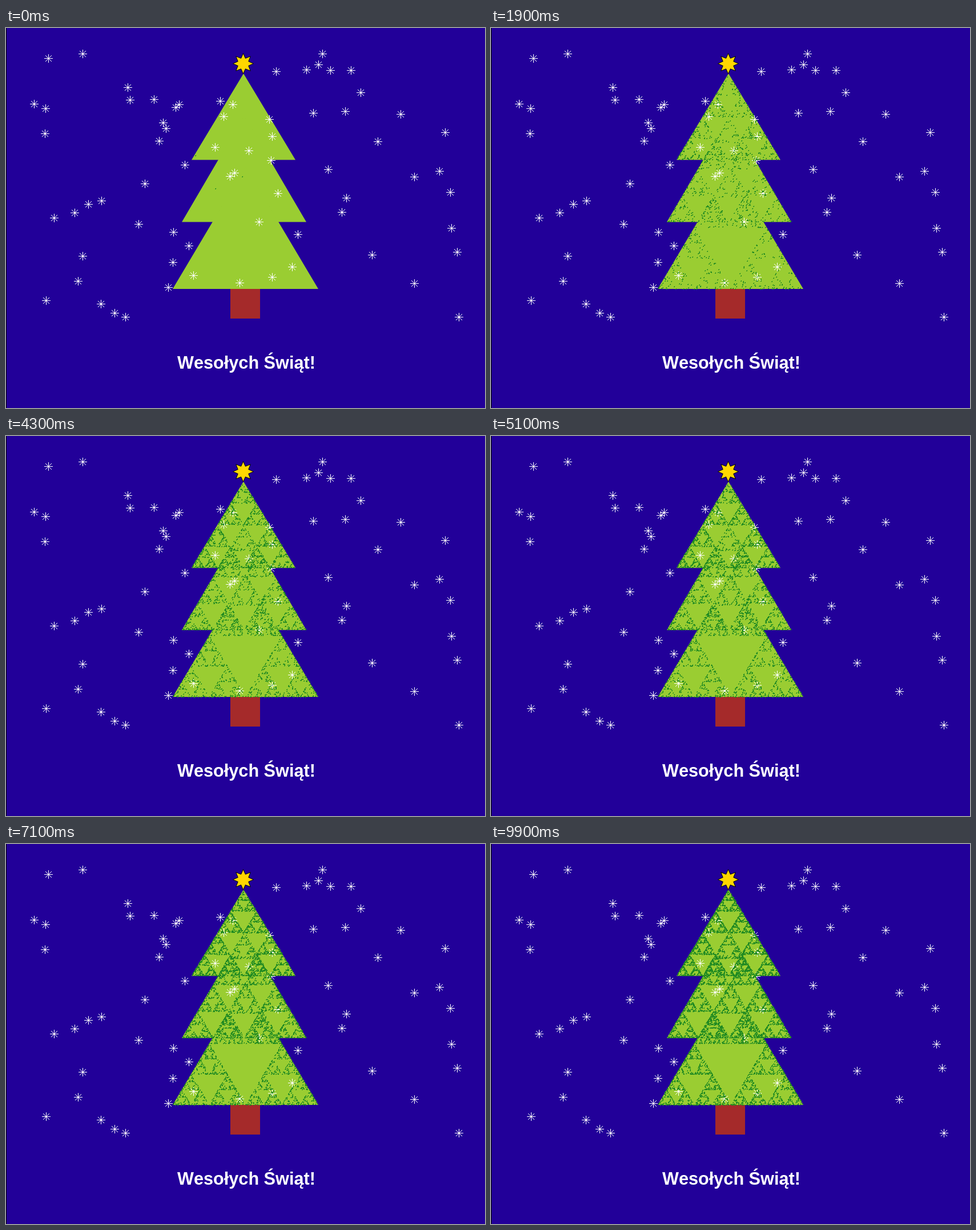
These frames come from a looping animation (839x667 px, 10000 ms). An HTML page with a canvas:

```html
<!DOCTYPE html>
<html lang="pl">
<head>
<meta charset="utf-8">
<title>Wesołych Świąt!</title>
<style>
html, body { margin: 0; width: 100%; height: 100%; overflow: hidden; background: #209; }
canvas { display: block; }
</style>
</head>
<body>
<canvas width="839" height="667"></canvas>
<script>
const ctx = document.querySelector('canvas').getContext('2d');
const STEP = 100, STEPS = 100, DOTS_PER_STEP = 25;

// Each tier: apex, left and right corners, and the first dot of its chaos game.
const tiers = [
  { corners: [[416, 80], [325, 231.5], [507, 231.5]], start: [332, 224] },
  { corners: [[417, 154], [308, 340.5], [526, 340.5]], start: [367, 282] },
  { corners: [[419.5, 243], [292, 458], [547, 458]], start: [414, 261] },
];

const flakes = [
  74,53, 134,45, 213,104, 217,126, 259,125, 49,133, 69,141, 68,185, 303,134, 297,139,
  275,166, 280,176, 268,198, 313,240, 243,273, 167,303, 144,309, 120,324, 84,333, 232,344,
  293,358, 320,382, 134,400, 292,411, 126,444, 284,455, 70,478, 166,484, 190,500, 209,507,
  375,128, 397,134, 381,155, 461,160, 466,190, 366,209, 425,215, 464,232, 400,254, 392,260,
  476,290, 443,340, 511,362, 501,419, 466,437, 409,447, 328,434, 473,76, 526,73, 554,45,
  547,64, 568,74, 604,74, 621,113, 594,146, 538,149, 691,151, 651,199, 769,183, 564,248,
  596,298, 588,323, 715,261, 759,251, 778,288, 780,351, 790,393, 641,398, 715,448, 793,507,
];

let seed = 2024;
function random() {
  seed = (Math.imul(seed, 1664525) + 1013904223) >>> 0;
  return seed / 2 ** 32;
}

// Sierpinski dots: jump halfway towards a random corner each time.
for (const tier of tiers) {
  let [x, y] = tier.start;
  tier.dots = [[x, y]];
  for (let i = 1; i < STEPS * DOTS_PER_STEP; i++) {
    const [cx, cy] = tier.corners[Math.floor(random() * 3)];
    x = (x + cx) / 2;
    y = (y + cy) / 2;
    tier.dots.push([x, y]);
  }
}

function polygon(points, fill) {
  ctx.beginPath();
  for (const [x, y] of points) ctx.lineTo(x, y);
  ctx.closePath();
  ctx.fillStyle = fill;
  ctx.fill();
}

function drawStar(cx, cy) {
  const points = Array.from({ length: 16 }, (_, i) => {
    const r = i % 2 ? 10 : 18, a = i * Math.PI / 8;
    return [cx + r * Math.cos(a), cy + r * Math.sin(a)];
  });
  polygon(points, 'gold');
  ctx.lineWidth = 1;
  ctx.strokeStyle = '#000';
  ctx.stroke();
}

function drawFlake(x, y) {
  for (let i = -7; i <= 7; i++) {
    ctx.fillRect(x + i, y, 1, 1);
    ctx.fillRect(x, y + i, 1, 1);
    if (Math.abs(i) > 5) continue;
    ctx.fillRect(x + i, y + i, 1, 1);
    ctx.fillRect(x + i, y - i, 1, 1);
  }
}

function drawScene() {
  ctx.fillStyle = '#209';
  ctx.fillRect(0, 0, 839, 667);
  ctx.fillStyle = '#000';
  ctx.fillRect(0, 0, 1, 667);
  ctx.fillStyle = 'brown';
  ctx.fillRect(393, 458, 52, 52);
  for (const tier of tiers) polygon(tier.corners, 'yellowgreen');
  drawStar(415.5, 62.5);
  ctx.fillStyle = '#fff';
  for (let i = 0; i < flakes.length; i += 2) drawFlake(flakes[i], flakes[i + 1]);
  ctx.font = 'bold 30.67px "Liberation Sans", Arial, sans-serif';
  ctx.fontKerning = 'none';
  ctx.fillText('Wesołych Świąt!', 300, 598);
}

function drawDots(step) {
  ctx.fillStyle = 'forestgreen';
  for (const { dots } of tiers) {
    for (const [x, y] of dots.slice(0, 1 + step * DOTS_PER_STEP)) {
      const px = Math.round(x), py = Math.round(y);
      ctx.fillRect(px, py, 1, 1);
      ctx.fillRect(px - 1, py, 1, 1);
      ctx.fillRect(px, py - 1, 1, 1);
    }
  }
}

let shown = -1;
function frame() {
  const step = Math.floor(performance.now() / STEP) % STEPS;
  if (step !== shown) {
    drawScene();
    drawDots(step);
    shown = step;
  }
  requestAnimationFrame(frame);
}
frame();
</script>
</body>
</html>
```
